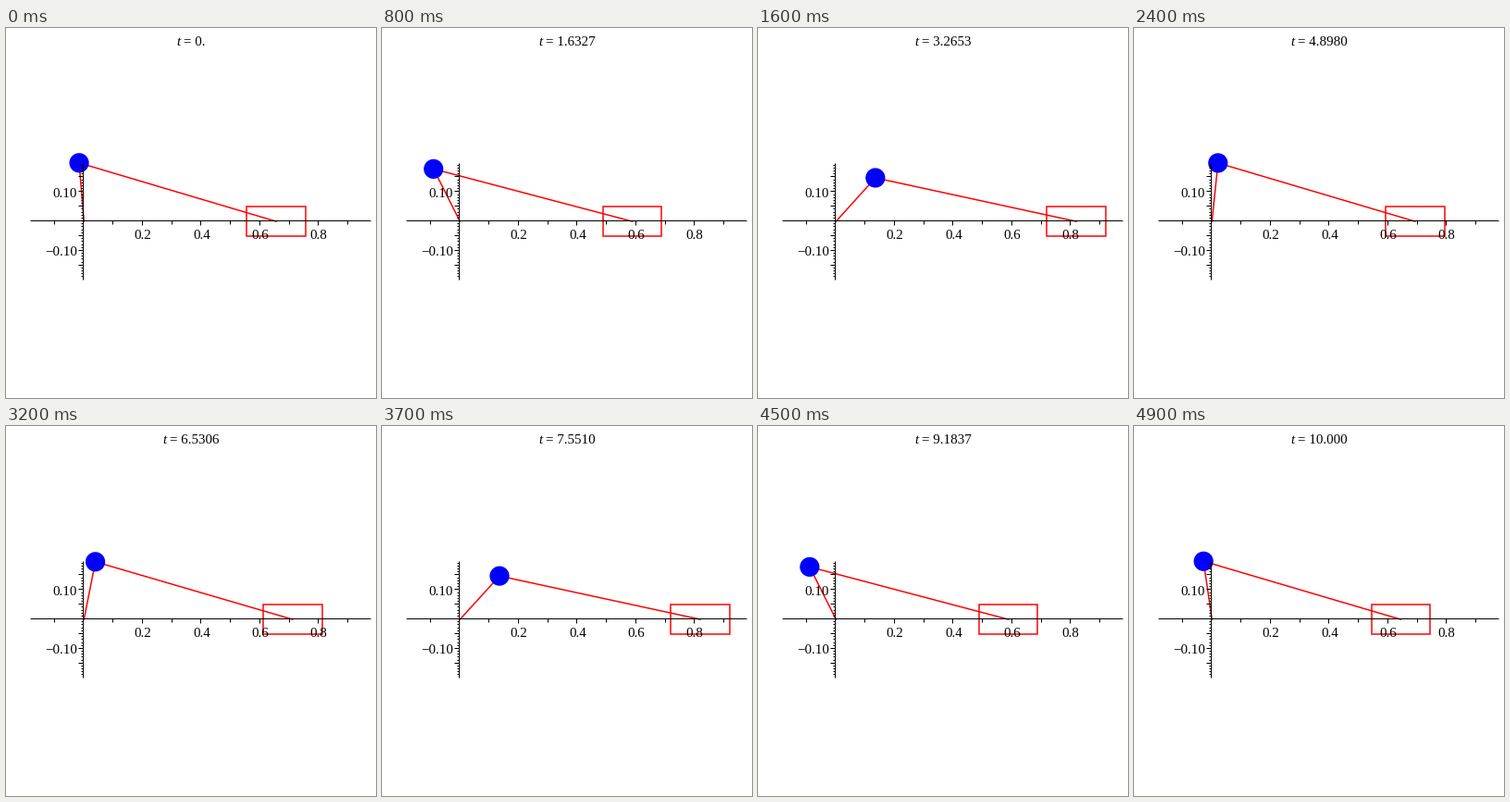
These frames come from a looping animation (400x400 px, 5 s). A matplotlib script:

```python
import math

import matplotlib.pyplot as plt
from matplotlib.animation import FuncAnimation
from matplotlib.patches import Circle, Rectangle

SIZE, DPI = 400, 100
PX = 72 / DPI                      # one pixel in points
FRAMES, INTERVAL, DURATION = 50, 100, 10.0

CRANK, ROD = 0.2, 0.7
GRAVITY, MASS_RATIO = 9.81, 25     # slider mass / crank mass
START_ANGLE = 1.6534
ORIGIN_X, ORIGIN_Y, SCALE = 84.3, 209.1, 317.5


def px(x):
    return ORIGIN_X + SCALE * x


def py(y):
    return ORIGIN_Y - SCALE * y


def acceleration(angle, speed):
    """Heavy slider driven by a falling crank mass, from the Lagrangian."""
    s, c = math.sin(angle), math.cos(angle)
    q = math.sqrt((ROD / CRANK) ** 2 - s * s)
    g = s * (1 + c / q)
    dg = c + (c * c - s * s) / q + (s * c) ** 2 / q ** 3
    inertia = 1 + MASS_RATIO * g * g
    return -(MASS_RATIO * g * dg * speed ** 2 + GRAVITY / CRANK * c) / inertia


def rk4_step(a, v, h):
    k1 = acceleration(a, v)
    v2 = v + h / 2 * k1
    k2 = acceleration(a + h / 2 * v, v2)
    v3 = v + h / 2 * k2
    k3 = acceleration(a + h / 2 * v2, v3)
    v4 = v + h * k3
    k4 = acceleration(a + h * v3, v4)
    return (a + h / 6 * (v + 2 * v2 + 2 * v3 + v4),
            v + h / 6 * (k1 + 2 * k2 + 2 * k3 + k4))


def solve_angles(substeps=200):
    angle, speed = START_ANGLE, 0.0
    h = DURATION / (FRAMES - 1) / substeps
    angles = [angle]
    for _ in range(FRAMES - 1):
        for _ in range(substeps):
            angle, speed = rk4_step(angle, speed, h)
        angles.append(angle)
    return angles


def format_time(t):
    """Five significant digits, with a bare point for zero."""
    if t == 0:
        return "0."
    return f"{t:.{4 - math.floor(math.log10(t) + 1e-9)}f}"


ANGLES = solve_angles()

fig = plt.figure(figsize=(SIZE / DPI, SIZE / DPI), dpi=DPI, facecolor="white")
ax = fig.add_axes([0, 0, 1, 1])
ax.set_xlim(0, SIZE)
ax.set_ylim(SIZE, 0)
ax.axis("off")


def segment(x0, y0, x1, y1):
    # Hairlines sit on the pixel up and left of their coordinate.
    ax.plot([x0 - 1, x1 - 1], [y0 - 1, y1 - 1], color="black", lw=PX,
            zorder=4, snap=True, solid_capstyle="butt")


def label(x, y, text, align="left", **style):
    return ax.text(x, y, text, ha=align, va="baseline", zorder=5,
                   family="Liberation Serif", fontsize=15 * PX, **style)


def draw_axes():
    segment(27, ORIGIN_Y, 395, ORIGIN_Y)
    segment(ORIGIN_X, 147, ORIGIN_X, 273)
    for i in range(-1, 10):
        if i:
            length = 5 if i % 2 == 0 else 3.5
            segment(px(i / 10), ORIGIN_Y, px(i / 10), ORIGIN_Y + length)
    for i in range(-19, 20):
        if i:
            length = 5 if i % 5 == 0 else 2.5
            segment(ORIGIN_X - length, py(i / 100), ORIGIN_X, py(i / 100))
    for i in (2, 4, 6, 8):
        label(px(i / 10), 228, f"{i / 10:.1f}", "center")
    label(77, 183, "0.10", "right")
    label(77, 246, "\u22120.10", "right")


draw_axes()
linkage, = ax.plot([], [], color="red", lw=1.5 * PX, zorder=2)
slider = Rectangle((0, 0), 0.2 * SCALE, 0.1 * SCALE, fill=False,
                   ec="red", lw=1.5 * PX, zorder=2)
ball = Circle((0, 0), 10.6, fc="blue", ec="none", zorder=3)
ax.add_patch(slider)
ax.add_patch(ball)
time_name = label(0, 19, "t", style="italic")
time_value = label(0, 19, "")


def update(frame):
    angle = ANGLES[frame]
    x, y = CRANK * math.cos(angle), CRANK * math.sin(angle)
    end = x + math.sqrt(ROD ** 2 - y ** 2)
    linkage.set_data([px(0), px(x), px(end)], [py(0), py(y), py(0)])
    slider.set_xy((px(end - 0.1), py(0.05)))
    ball.center = px(x), py(y)

    number = format_time(DURATION * frame / (FRAMES - 1))
    left = 200 - (24.5 + 7.5 * (len(number) - 1)) / 2
    time_name.set_x(left)
    time_value.set_x(left + 8)
    time_value.set_text("= " + number)
    return linkage, slider, ball, time_name, time_value


anim = FuncAnimation(fig, update, frames=FRAMES, interval=INTERVAL,
                     repeat=True, repeat_delay=0, blit=False)
plt.show()
```
